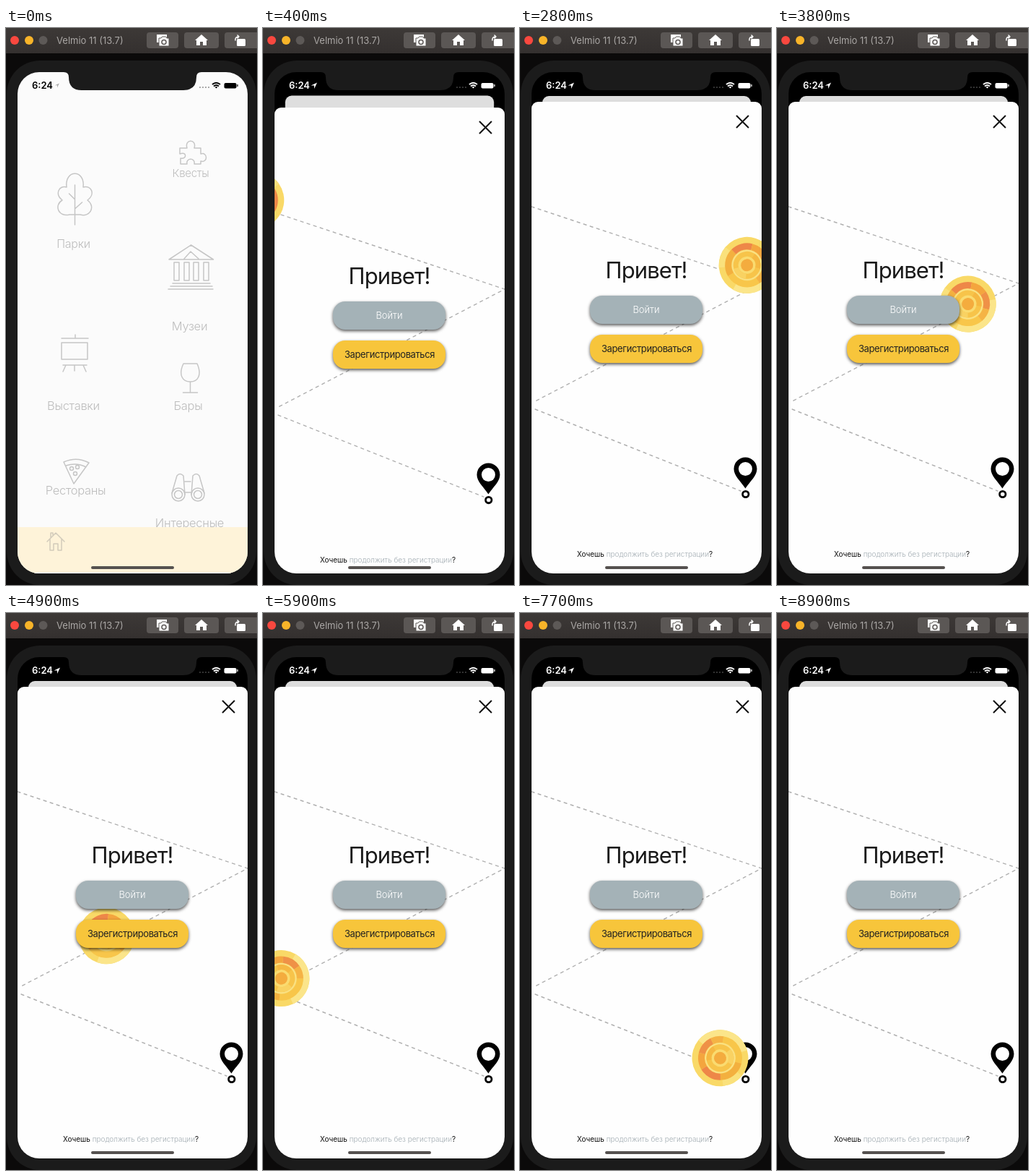
Animation, 348 px wide and 770 px high, one loop 9100 ms. Source, as an HTML page:

```html
<!DOCTYPE html>
<html lang="ru">
<head>
<meta charset="utf-8">
<title>Welcome sheet</title>
<style>
  html, body { margin: 0; width: 100%; height: 100%; overflow: hidden; background: #0b0a0a; }
  svg { display: block; width: 348px; height: 770px; font-family: Inter, Roboto, sans-serif; }
  .line { fill: none; stroke-linecap: round; stroke-linejoin: round; }
  .mid { text-anchor: middle; }
  #list text { fill: #bdbdbd; font-weight: 300; text-anchor: middle; letter-spacing: -.3px; }
  #icons { stroke: #c6c6c6; stroke-width: 1.5; }
  .button { filter: drop-shadow(0 2px 2px #000a); }
</style>
</head>
<body>
<svg viewBox="0 0 348 770">
  <defs>
    <linearGradient id="bar" x2="0" y2="1"><stop stop-color="#3d3937"/><stop offset="1" stop-color="#34302f"/></linearGradient>
    <clipPath id="screen"><rect x="16" y="61" width="319" height="693" rx="30"/></clipPath>
  </defs>

  <!-- Window bar -->
  <rect width="348" height="35" fill="url(#bar)"/>
  <circle cx="12" cy="17" r="6" fill="#f9483f"/>
  <circle cx="32" cy="17" r="6" fill="#f8b429"/>
  <circle cx="51.5" cy="17" r="6" fill="#5d5957"/>
  <text x="70" y="22" font-size="13" fill="#aaa7a5">Velmio 11 (13.7)</text>
  <g fill="#5b5755">
    <rect x="195" y="6" width="44" height="22" rx="4"/>
    <rect x="247" y="6" width="48" height="22" rx="4"/>
    <rect x="303" y="6" width="60" height="22" rx="4"/>
  </g>
  <g fill="#fff">
    <path d="M209 9h14v11h-14z"/>
    <path d="M212 14h3l1.5-2h5l1.5 2h3v11h-14z" stroke="#5b5755"/>
    <path d="M262 17l9-8 9 8h-2v7h-5v-5h-4v5h-5v-7z"/>
    <rect x="320" y="15" width="12" height="10" rx="1.5"/>
    <path class="line" d="M318 17v-1q0-4 5-4m-2-2 2 2-2 2" stroke="#fff" stroke-width="1.5"/>
  </g>
  <circle cx="219" cy="19.5" r="3" fill="none" stroke="#5b5755" stroke-width="1.5"/>

  <!-- Phone -->
  <rect x="1" y="45" width="346" height="725" rx="46" fill="#1b1b1b"/>
  <g clip-path="url(#screen)">
    <rect x="16" y="61" width="319" height="693" fill="#000"/>

    <g id="list">
      <rect id="page" x="16" y="61" width="319" height="693" fill="#fbfbfb"/>
      <g id="icons" class="line">
        <path d="M241 166h10c-4-13 14-13 10 0h9v8c10-3 10 13 0 10v4h-9c2-9-12-9-10 0h-9v-8c9 2 9-10-1-6z"/>
        <path d="M95.500 272v-55m0 33 10-9m-10-4-8-8M88 258c-15 4-22-13-10-20-11-9-4-21 6-18-3-25 26-25 23 0 12-3 17 10 6 18 12 9 3 24-10 20z"/>
        <path d="M226 320l30.500-20 31 20zm21-1 9-10 11 10M233 324v25h7v-25zm14 0v25h7v-25zm13 0v25h7v-25zm14 0v25h7v-25zM231 353h52m-55 4h58m-61 4h62"/>
        <path d="M77 429h37m-18-5v5M77 435h36v23H77zm2 31h33m-29 0-4 9m28-9 4 9m-16-9v8"/>
        <path d="M246 464h19c7 16 1 25-9.500 25s-17-9-9.500-25zm9.500 25v14m-10 1h20"/>
        <path d="M80 600q18-8 35 1l-21 29zm3 5q15-5 28 2"/>
        <circle cx="91" cy="609" r="2.5"/><circle cx="99" cy="607" r="2.5"/><circle cx="96" cy="616" r="2.5"/>
        <circle cx="239" cy="645" r="9"/><circle cx="266" cy="645" r="9"/>
        <circle cx="239" cy="645" r="5.5"/><circle cx="266" cy="645" r="5.5"/>
        <path d="M230 643l7-24q4-5 9 0l2 26m27-2-7-24q-4-5-9 0l-2 26m-9-18h8m-9 15h11"/>
      </g>
      <text x="256" y="206" font-size="15">Квесты</text>
      <text x="93.5" y="304" font-size="16">Парки</text>
      <text x="254.5" y="418" font-size="16.5">Музеи</text>
      <text x="93.5" y="528" font-size="16.5">Выставки</text>
      <text x="252.5" y="528" font-size="16.5">Бары</text>
      <text x="96.5" y="645" font-size="16.5">Рестораны</text>
      <text x="254.5" y="690" font-size="16.5">Интересные</text>
      <rect x="16" y="690" width="319" height="64" fill="#fef3d9"/>
      <path class="line" d="M57 710l12-12 12 12m-20-3v15h5v-9h6v9h5v-15M62 704v-6h3v3" stroke="#d2cbbb" stroke-width="1.5"/>
      <rect id="dim" x="16" y="61" width="319" height="693"/>
    </g>

    <g id="sheet">
      <rect x="16" y="102" width="319" height="700" rx="9" fill="#fefefe"/>
      <path class="line" d="M16 247L335 353 21 516M21 527L306 640" stroke="#b0b0b0" stroke-width="1.4" stroke-dasharray="4 5.5"/>
      <path d="M300 121l17 17m0-17-17 17" stroke="#111" stroke-width="2"/>
      <path d="M312.500 636.500C305.500 626 296.500 619 296.500 609.500a16 16 0 0 1 32 0C328.500 619 319.500 626 312.500 636.500z"/>
      <circle cx="312.5" cy="609.5" r="9.5" fill="#fff"/>
      <circle cx="312.8" cy="644.5" r="4.2" fill="#fff" stroke="#000" stroke-width="2.8"/>
      <g id="coin">
        <circle r="39" fill="#f9d967"/>
        <circle r="21" fill="#fae184"/>
        <circle r="19" fill="#f7c44a"/>
        <circle r="12" fill="#fadb70"/>
        <circle r="8.5" fill="#f4ac3e"/>
        <g id="arcs" fill="none"></g>
      </g>
      <text class="mid" x="175" y="346" font-size="31" letter-spacing="-.9" fill="#1a1a1a">Привет!</text>
      <rect class="button" x="97" y="370" width="156" height="39" rx="17" fill="#a4b2b7"/>
      <rect class="button" x="97" y="424" width="156" height="39" rx="17" fill="#f7c53b"/>
      <text class="mid" x="175" y="394" font-size="13" font-weight="300" fill="#fff">Войти</text>
      <text class="mid" x="175.5" y="448" font-size="13" letter-spacing="-.4" fill="#222">Зарегистрироваться</text>
      <text x="79" y="731" font-size="10" fill="#111">Хочешь <tspan font-weight="300" fill="#a3adb3">продолжить без регистрации</tspan>?</text>
    </g>

    <rect x="118" y="744" width="115" height="4" rx="2" fill="#55514f"/>
    <path d="M80 61q7 0 7 7 0 18 18 18h141q18 0 18-18 0-7 7-7z" fill="#1b1b1b"/>
    <g id="status">
      <text x="36" y="84" font-size="13" font-weight="600">6:24</text>
      <path id="arrow" d="M66.500 79.500l8.500-4-4 8.500v-4.500z"/>
      <path id="dots" d="M268 82h14" stroke="#aaa" stroke-width="2" stroke-dasharray="2"/>
      <path d="M286 78q5.500-4.500 11 0m-9 2.500q3.500-3 7 0" fill="none" stroke="currentColor" stroke-width="2"/>
      <path d="M289.700 81.700l1.800 1.800 1.800-1.800q-1.800-1.500-3.600 0z"/>
      <rect x="302.5" y="76" width="17" height="7.5" rx="2"/>
      <path d="M321 78v3" stroke="currentColor" stroke-width="1.2"/>
    </g>
  </g>
</svg>
<script>
const LOOP = 9100, STEP = 100, RISE = 651;
const $ = id => document.getElementById(id);
const set = (id, name, value) => $(id).setAttribute(name, value);

// radius, width, start and end in degrees, colour
const bands = [
  [34.5, 9, 90, 215, '#fbe58a'], [34.5, 9, 270, 315, '#fae17c'],
  [26, 9, 150, 245, '#f8c64a'], [26, 9, 245, 320, '#f3b03f'],
  [26, 9, -40, 20, '#ee8748'], [26, 9, 20, 65, '#f4a53e'],
  [26, 9, 65, 115, '#ef9147'], [26, 9, 115, 150, '#f5b345'],
  [15.5, 7, 40, 110, '#f5b842'], [15.5, 7, 190, 260, '#f9d262']
];
const polar = (r, deg) => [r * Math.cos(deg * Math.PI / 180), r * Math.sin(deg * Math.PI / 180)];
$('arcs').innerHTML = bands.map(([r, w, a, b, color]) =>
  `<path d="M${polar(r, a)}A${r} ${r} 0 0 1 ${polar(r, b)}" stroke="${color}" stroke-width="${w}"/>`).join('');

// Rows of [time, ...values], joined by straight lines
const path = [[50, -58, 215], [1700, 169.5, 285], [3060, 349, 338], [6000, 14, 511], [9000, 479, 695]];
const spin = [[400, 10], [1700, 0], [2800, -95], [4900, -105], [6800, -190], [9000, -290]];

function sample(rows, t) {
  let i = 1;
  while (i < rows.length - 1 && t > rows[i][0]) i++;
  const [a, b] = [rows[i - 1], rows[i]];
  const k = Math.min(1, Math.max(0, (t - a[0]) / (b[0] - a[0])));
  return a.slice(1).map((v, n) => v + (b[n + 1] - v) * k);
}

function draw(t) {
  // Critically damped spring brings the sheet up
  const s = Math.max(0, t - 50) / 1000 * 18.26;
  const left = (1 + s) * Math.exp(-s), p = 1 - left;
  set('sheet', 'transform', `translate(0 ${RISE * left})`);
  set('list', 'transform', `translate(175.5 ${61 + 33 * p}) scale(${1 - .094 * p}) translate(-175.5 -61)`);
  set('page', 'rx', 10 * p);
  set('dim', 'rx', 10 * p);
  set('dim', 'opacity', .12 * p);

  const [x, y] = sample(path, t);
  set('coin', 'transform', `translate(${x} ${y}) rotate(${sample(spin, t)[0]})`);

  const ink = p > .5 ? '#fff' : '#000';
  set('status', 'fill', ink);
  set('status', 'color', ink);
  set('arrow', 'fill', p > .5 ? '#fff' : '#aaa');
  set('arrow', 'transform', p > .5 ? '' : 'translate(21.3 23.7) scale(.7)');
  set('dots', 'stroke', p > .5 ? '#333' : '#aaa');
}

const start = performance.now();
function tick() {
  const t = (performance.now() - start) % LOOP;
  draw(Math.floor(t / STEP) * STEP);
  requestAnimationFrame(tick);
}
tick();
</script>
</body>
</html>
```
